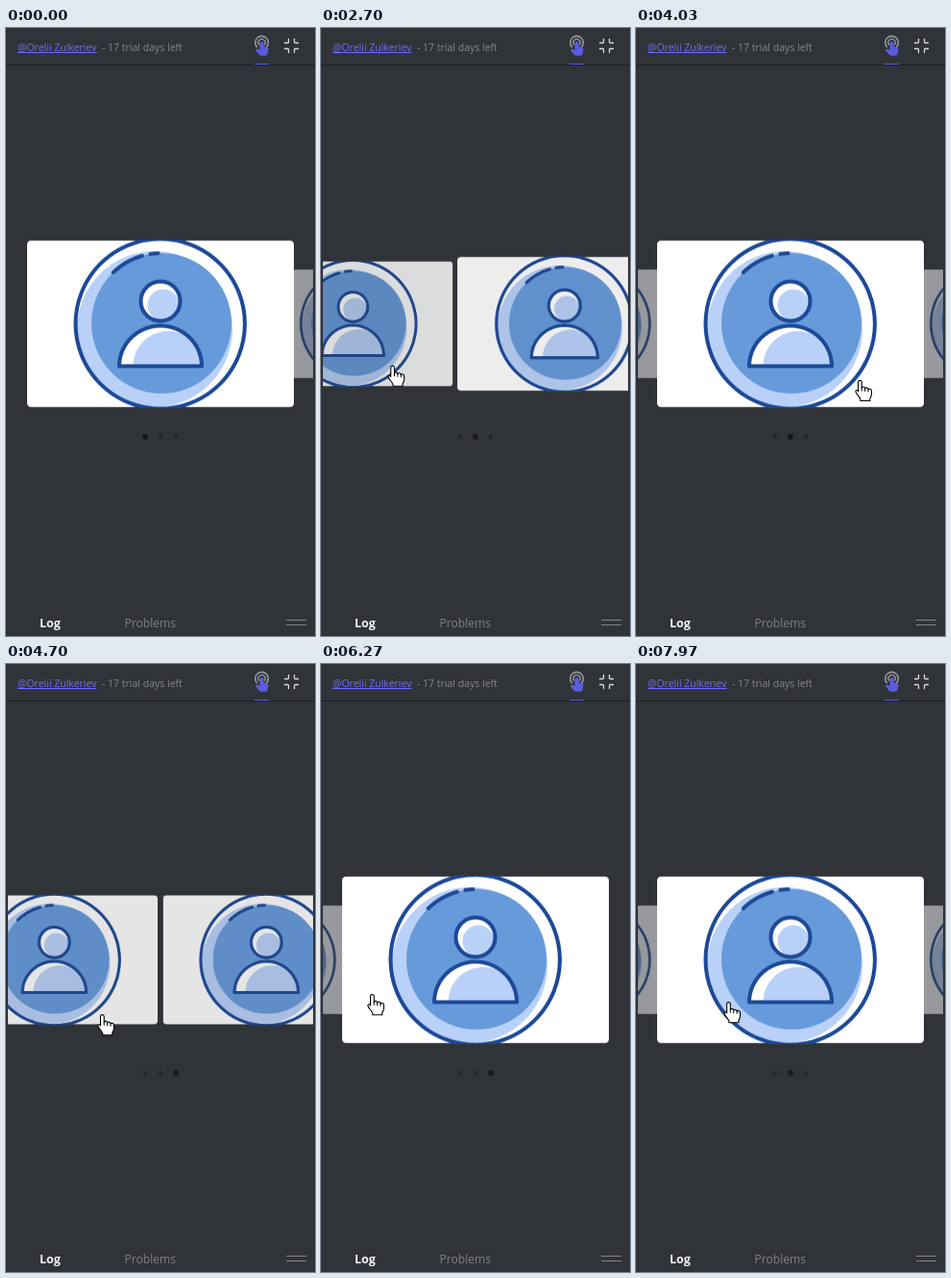
Animation, 322 px wide and 632 px high, one loop 8 s. Source, as an HTML page with a canvas:

```html
<!DOCTYPE html>
<html lang="en">
<head>
<meta charset="utf-8">
<title>Card carousel</title>
<style>
  html, body { margin: 0; width: 100%; height: 100%; overflow: hidden; background: #303338; }
  canvas { display: block; width: 322px; height: 632px; }
</style>
</head>
<body>
<canvas id="stage"></canvas>
<script>
const W = 322, H = 632, LOOP = 8000;
const BG = '#303338', NAVY = '#1c4998', BLUE = '#669adb', PALE = '#b9d1f8';
const LINK = '#706cff', INDIGO = '#5a5ce0';
const FONT = '"Open Sans", "Noto Sans", sans-serif';
const dpr = window.devicePixelRatio || 1;
const stage = document.getElementById('stage');
stage.width = W * dpr;
stage.height = H * dpr;
const ctx = stage.getContext('2d');

// ---- easing and keyframes ----
const smooth = t => t * t * (3 - 2 * t);
const out = t => 1 - (1 - t) ** 2;

// The CSS "ease" curve, cubic-bezier(.25, .1, .25, 1)
function cssEase(x) {
  const bez = (s, a, b) => 3 * s * (1 - s) ** 2 * a + 3 * s * s * (1 - s) * b + s ** 3;
  let lo = 0, hi = 1;
  for (let i = 0; i < 24; i++) {
    const mid = (lo + hi) / 2;
    if (bez(mid, 0.25, 0.25) < x) lo = mid; else hi = mid;
  }
  return bez(lo, 0.1, 1);
}

// Each move: start, end, target values, easing
function track(first, moves, time) {
  let cur = first;
  for (const [start, end, to, ease] of moves) {
    if (time < start) break;
    const k = ease(Math.min(1, (time - start) / (end - start)));
    cur = cur.map((v, i) => v + (to[i] - v) * k);
  }
  return cur;
}

const slides = [
  [2070, 2980, [0.755], smooth],
  [2980, 3280, [1], cssEase],
  [4110, 4700, [1.5], smooth],
  [4700, 5000, [2], cssEase],
  [6580, 7035, [1.663], smooth],
  [7035, 7335, [1], cssEase]
];
const pointer = [
  [1430, 1800, [250, 355.5], out],
  [2085, 2980, [21.5, 349], smooth],
  [3700, 4060, [237, 366], smooth],
  [4110, 4700, [100, 364], smooth],
  [5430, 6285, [53, 343], smooth],
  [6530, 7010, [200, 362], smooth],
  [7035, 7330, [189, 361], smooth],
  [7400, 7985, [96, 351], smooth]
];

// ---- drawing helpers ----
function disc(c, x, y, r, fill) {
  c.beginPath();
  c.arc(x, y, r, 0, Math.PI * 2);
  c.fillStyle = fill;
  c.fill();
}

function strokePath(c, d, color, width) {
  c.strokeStyle = color;
  c.lineWidth = width;
  c.stroke(new Path2D(d));
}

function label(text, x, y, size, color, weight = 400) {
  ctx.font = `${weight} ${size}px ${FONT}`;
  ctx.fillStyle = color;
  ctx.fillText(text, x, y);
  return ctx.measureText(text).width;
}

// ---- the card, painted once around its centre ----
const CW = 282, CH = 180;

function makeCard() {
  const cv = document.createElement('canvas');
  const res = 2 * dpr;
  cv.width = CW * res;
  cv.height = CH * res;
  const c = cv.getContext('2d');
  c.scale(res, res);
  c.translate(CW / 2, CH / 2);
  c.lineCap = c.lineJoin = 'round';

  c.fillStyle = '#fff';
  c.beginPath();
  c.roundRect(-139, -86.5, 278, 173, 4);
  c.fill();

  c.beginPath();
  c.rect(-139, -87.5, 278, 175);
  c.clip();
  disc(c, -6, 5.5, 81, PALE);
  disc(c, 1, -0.5, 73, BLUE);

  c.strokeStyle = NAVY;
  c.lineWidth = 4;
  c.beginPath();
  c.arc(-0.3, 0, 88.2, 0, Math.PI * 2);
  c.stroke();
  for (const [a, b] of [[-2.33, -1.85], [-1.73, -1.62]]) {
    c.beginPath();
    c.arc(1, -0.5, 73, a, b);
    c.stroke();
  }

  const head = new Path2D();
  head.arc(0, -23.5, 20.5, 0, Math.PI * 2);
  const body = new Path2D('M-43 44 A43 42 0 0 1 43 44 Z');
  for (const [shape, x, y, r] of [[head, 3, -19.5, 16.5], [body, 8, 44, 36.5]]) {
    c.fillStyle = '#fff';
    c.fill(shape);
    c.save();
    c.clip(shape);
    disc(c, x, y, r, PALE);
    c.restore();
    c.strokeStyle = NAVY;
    c.stroke(shape);
  }
  return cv;
}
const card = makeCard();

// Neighbours recede: they shift, shrink and fade with distance
function drawCard(offset) {
  const d = Math.abs(offset);
  if (d > 1.6) return;
  const shift = d * (204 + 34 * (1 - d)) * Math.sign(offset);
  const scale = 1 / (1 + d * (0.534 + 0.1 * (1 - d)));
  const w = CW * scale, h = CH * scale;
  ctx.globalAlpha = 1 - 0.5 * Math.min(1, d) ** 2;
  ctx.drawImage(card, 161 + shift - w / 2, 307.5 - h / 2, w, h);
  ctx.globalAlpha = 1;
}

function drawCarousel(pos) {
  const active = Math.round(pos);
  ctx.save();
  ctx.beginPath();
  ctx.rect(2, 200, 318, 215);
  ctx.clip();
  for (let i = 0; i < 3; i++) if (i !== active) drawCard(i - pos);
  drawCard(active - pos);
  ctx.restore();
  for (let i = 0; i < 3; i++) {
    const on = i === active;
    disc(ctx, 145 + i * 16, 425, on ? 2.9 : 2.2, on ? '#17181b' : '#222529');
  }
}

function drawHeader() {
  ctx.fillStyle = '#1d1e21';
  ctx.fillRect(0, 38, W, 1);
  const w = label('@Orelii Zulkeriev', 12, 24, 10.5, LINK);
  ctx.fillStyle = LINK;
  ctx.fillRect(12, 25, w, 1);
  label('- 17 trial days left', 100, 24, 10.5, '#85878b');

  // tap icon
  ctx.lineCap = 'round';
  ctx.lineJoin = 'round';
  strokePath(ctx, 'M261.3 19.6 A6.8 6.8 0 1 1 271.7 19.6', '#96979d', 1.6);
  strokePath(ctx, 'M263.4 17.2 A3.7 3.7 0 1 1 269.6 17.2', '#96979d', 1.3);
  ctx.fillStyle = INDIGO;
  ctx.fill(new Path2D('M264.4 15.5 Q266.5 12.8 268.6 15.5 V19.2 L271.8 20 Q273.6 20.5 273.4 22.4 L272.6 26.4 Q272.1 28.8 269.8 28.8 H266.3 Q264.6 28.8 263.5 27.5 L260 23 Q260.4 21.2 262.2 21.8 L264.4 23 Z'));
  ctx.fillRect(259, 37, 15, 1);

  // collapse icon
  strokePath(ctx, 'M290.5 15.5 H293.5 Q294.5 15.5 294.5 14.5 V11.5 M300.5 11.5 V14.5 Q300.5 15.5 301.5 15.5 H304.5 M290.5 21.5 H293.5 Q294.5 21.5 294.5 22.5 V25.5 M300.5 25.5 V22.5 Q300.5 21.5 301.5 21.5 H304.5', '#d9dadc', 1.3);
}

function drawFooter() {
  label('Log', 35, 623, 12.5, '#f2f2f3', 700);
  label('Problems', 123.5, 623, 12.1, '#808286');
  ctx.fillStyle = '#84868a';
  ctx.fillRect(292, 615, 21, 1);
  ctx.fillRect(292, 620, 21, 1);
}

const hand = new Path2D('M-2 2 C-2 -.2 1.7 -.2 1.7 2 V8 C2.2 6.5 5 6.8 5.1 8.6 C5.8 7.4 8.4 7.8 8.5 9.7 C9.2 8.6 11.9 9 11.9 11 V15 C11.9 17 10.3 18 10.3 19.6 V21.5 H.3 V19.6 C-.8 17 -3.8 14.6 -4.6 12.2 C-5 10.2 -3.2 9.8 -2 11.6 Z');

function drawHand(x, y) {
  ctx.save();
  ctx.translate(x + 0.5, y + 0.3);
  ctx.lineJoin = 'round';
  ctx.fillStyle = '#fff';
  ctx.fill(hand);
  ctx.strokeStyle = '#000';
  ctx.lineWidth = 1.1;
  ctx.stroke(hand);
  strokePath(ctx, 'M1.7 8 V11 M5.1 8.8 V11.5 M8.5 9.8 V12', '#000', 1);
  ctx.restore();
}

function render(time) {
  ctx.setTransform(dpr, 0, 0, dpr, 0, 0);
  ctx.imageSmoothingQuality = 'high';
  ctx.fillStyle = BG;
  ctx.fillRect(0, 0, W, H);
  drawHeader();
  drawFooter();
  drawCarousel(track([0], slides, time)[0]);
  if (time >= 1430) drawHand(...track([303, 316], pointer, time));
}

const begin = performance.now();
function loop() {
  render((performance.now() - begin) % LOOP);
  requestAnimationFrame(loop);
}
loop();
</script>
</body>
</html>
```
